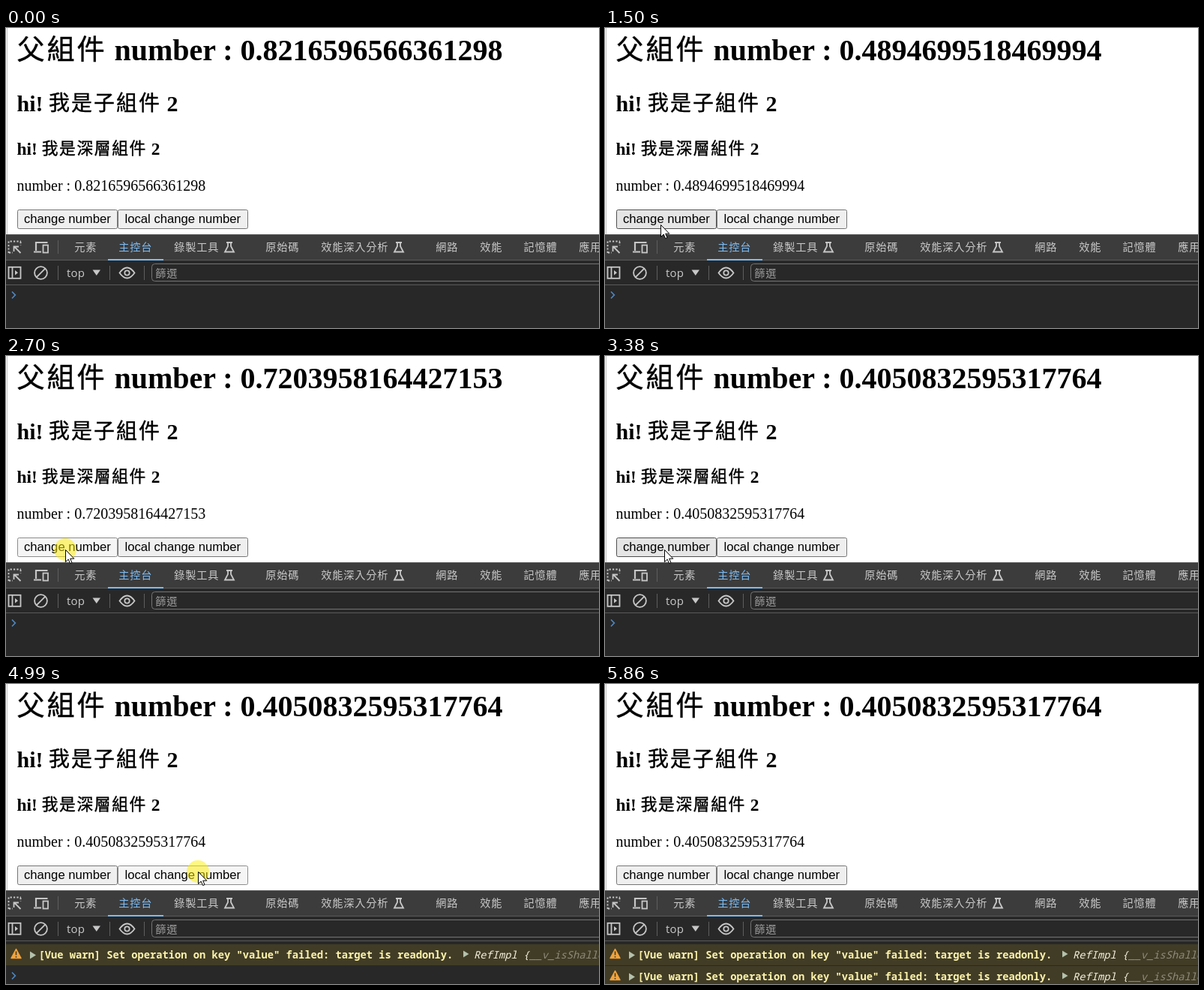
Write an HTML page that moves like this. It is 791 px wide and 400 px high and loops after 6740 ms.

```html
<!DOCTYPE html>
<html lang="zh-Hant">
<head>
<meta charset="utf-8">
<title>readonly number</title>
<style>
  html, body { margin: 0; width: 100%; height: 100%; overflow: hidden; background: #fff; }
  svg { display: block; width: 791px; height: 400px; }
  text { white-space: pre; }
  .page { font-family: "Liberation Serif", serif; font-weight: 700; }
  .page tspan.zh {
    font-family: "Noto Sans CJK TC", sans-serif; font-weight: 500; font-size: .93em;
    letter-spacing: .075em; baseline-shift: .03em; stroke: #000; stroke-width: .4px;
  }
  .button rect { fill: #efefef; stroke: #767676; }
  .button.hover rect { fill: #e5e5e5; stroke: #4f4f4f; }
  .button.active rect { fill: #f5f5f5; stroke: #8d8d8d; }
  .button text { font: 16.667px "Liberation Sans", Arial, sans-serif; }
  .tools text { font: 14.2px "Noto Sans CJK TC", sans-serif; letter-spacing: .8px; fill: #c9c9c9; }
  .tools text.on { fill: #7cbcf5; }
  .tools text.hint { fill: #9a9a9a; }
  .tools text.top { font: 15px "Open Sans", sans-serif; letter-spacing: .2px; }
  .icon { fill: none; stroke: #c7c7c7; stroke-width: 1.8; }
  .log text { font: 600 13.75px "Noto Sans Mono", "Liberation Mono", monospace; fill: #fdf3aa; }
  .log .obj { font-style: italic; font-weight: 500; fill: #f4f0dc; }
  .log .key { fill: #8f8b7a; }
</style>
</head>
<body>
<svg viewBox="0 0 791 400">
  <defs>
    <path id="flask" class="icon" d="M-4-6.5H4M-2-6.5V-1.5L-6 6H6L2-1.5V-6.5" stroke-width="1.5"/>
    <g id="warning" class="log">
      <rect y="347" width="791" height="28" fill="#413c26"/>
      <path d="M13.5 353.5L20 365.5H7Z" fill="#f2a33c" stroke="#f2a33c" stroke-width="1.5" stroke-linejoin="round"/>
      <path d="M13.5 356.5V361.5M13.5 363V364.8" stroke="#413c26" stroke-width="1.6"/>
      <path d="M32 356.5L40 361.5 32 366.5Z" fill="#b5c1ac"/>
      <text x="43.5" y="366">[Vue warn] Set operation on key "value" failed: target is readonly.</text>
      <path d="M610 355.5L617.5 360 610 364.5Z" fill="#b5c1ac"/>
      <text class="obj" x="624" y="365.5">RefImpl {<tspan class="key">__v_isShallow: false</tspan></text>
    </g>
  </defs>

  <rect width="791" height="400" fill="#fff"/>
  <rect x="1" width="1" height="275" fill="#c4c4c4"/>

  <g class="page">
    <text x="14.5" y="43" font-size="40"><tspan class="zh">父組件</tspan> number : <tspan class="num"></tspan></text>
    <text x="14.5" y="111" font-size="30">hi! <tspan class="zh">我是子組件</tspan> 2</text>
    <text x="14.5" y="169" font-size="23.4">hi! <tspan class="zh">我是深層組件</tspan> 2</text>
    <text x="14.5" y="217" font-size="20" font-weight="400">number : <tspan class="num"></tspan></text>
  </g>
  <g class="button">
    <rect x="15.5" y="242.5" width="133" height="25" rx="2"/>
    <text x="24" y="260">change number</text>
  </g>
  <g class="button">
    <rect x="149.5" y="242.5" width="173" height="25" rx="2"/>
    <text x="158.5" y="260">local change number</text>
  </g>

  <rect y="275" width="791" height="125" fill="#282828"/>
  <rect y="275" width="791" height="34" fill="#3c3c3c"/>
  <path d="M0 275.5H791M0 309.5H791M0 342.5H791" stroke="#5a5a5a"/>
  <rect x="136" y="308" width="74" height="2" fill="#7cbcf5"/>
  <path d="M69.5 283V301M69.5 317V336M138.5 317V336M184.5 317V336" stroke="#5e5e5e"/>

  <g class="tools">
    <text x="91.3" y="297">元素</text>
    <text x="150.3" y="297" class="on">主控台</text>
    <text x="224.3" y="297">錄製工具</text>
    <text x="346.3" y="297">原始碼</text>
    <text x="420.3" y="297">效能深入分析</text>
    <text x="573.3" y="297">網路</text>
    <text x="632.3" y="297">效能</text>
    <text x="690.5" y="297">記憶體</text>
    <text x="764.3" y="297">應用程式</text>
    <use href="#flask" x="298" y="292.5"/>
    <use href="#flask" x="524" y="292.5"/>
    <rect x="194.5" y="314.5" width="620" height="23" rx="4" fill="#282828" stroke="#757575"/>
    <text x="199.3" y="331.5" class="hint">篩選</text>
    <text x="81" y="331.5" class="top">top</text>
    <path d="M115.5 322.5H126L120.75 330Z" fill="#c7c7c7"/>
  </g>
  <g class="icon">
    <path d="M3.5 300V284.5H20" stroke-dasharray="2.2 2.2"/>
    <path d="M19.5 285V290M4 299.5H9" stroke-dasharray="2.2 2.2"/>
    <path d="M19.5 300L11 291.5M10.5 298V291.5H17"/>
    <path d="M40 297V286H55.5M37 298.5H47" stroke-width="2.2"/>
    <rect x="49.5" y="289.5" width="6.5" height="10"/>
    <rect x="3.5" y="318.8" width="16" height="15"/>
    <path d="M8.5 319V334"/>
    <path d="M12 323L16 326.3 12 329.6Z" fill="#c7c7c7" stroke="none"/>
    <circle cx="46.5" cy="326.5" r="8.4"/>
    <path d="M40.6 332.4L52.4 320.6"/>
    <path d="M151.5 326.5Q161.5 312.5 171.5 326.5Q161.5 340.5 151.5 326.5Z"/>
    <circle cx="161.5" cy="326.5" r="3.2"/>
  </g>

  <use href="#warning" class="warn"/>
  <use href="#warning" class="warn" y="29"/>
  <path id="prompt" d="M8 351.5L12.3 356 8 360.5" fill="none" stroke="#4f86bd" stroke-width="1.7"/>

  <circle id="halo" r="15" fill="#fff000" fill-opacity=".5"/>
  <path id="cursor" d="M.5.5V16.6L4.2 13.1 6.6 18.6 9 17.6 6.7 12.2H11.8Z" fill="#fff" stroke="#000"/>
</svg>
<script>
const LOOP = 6740;
const $ = q => document.querySelector(q);
const $$ = q => [...document.querySelectorAll(q)];
const nums = $$('.num'), buttons = $$('.button'), warns = $$('.warn');
const prompt = $('#prompt'), halo = $('#halo'), cursor = $('#cursor');

const easeOut = u => 1 - (1 - u) ** 1.8;
const easeIn = u => u ** 1.4;
const smooth = u => u * u * (3 - 2 * u);

// Each move takes n steps of dt along a quadratic curve; lead is the first step's index.
const moves = [
  { at: 330, dt: 70, n: 9, lead: 0, pts: [[643, 333], [330, 72], [73, 262]], ease: easeOut },
  { at: 1030, dt: 70, n: 1, lead: 1, pts: [[73, 262], [73, 262], [74, 262]], ease: smooth },
  { at: 1830, dt: 65, n: 2, lead: 1, pts: [[74, 262], [76, 260], [79, 258]], ease: smooth },
  { at: 3450, dt: 70, n: 7, lead: 1, pts: [[79, 258], [165, 252], [256, 250]], ease: smooth },
  { at: 5450, dt: 68, n: 6, lead: 1, pts: [[256, 250], [460, 285], [701, 390]], ease: easeIn }
];
const leave = 5860;

// halo on, button down, halo off, release
const clicks = [
  [1360, 1430, 1500, 1500],
  [1960, 1960, 2090, 2090],
  [2290, 2360, 2430, 2490],
  [2640, 2700, 2830, 2830],
  [3250, 3250, 3380, 3380],
  [4060, 4130, 4200, 4200],
  [4990, 4990, 5120, 5120]
];
const values = [
  '0.8216596566361298', '0.4894699518469994', '0.3486213714932096',
  '0.7203958164427153', '0.05318274960341827', '0.4050832595317764'
];

function pointer(t) {
  const m = moves.filter(m => t >= m.at).pop();
  if (!m || t >= leave) return null;
  const step = Math.floor((t - m.at) / m.dt) + m.lead;
  const u = m.ease(Math.min(1, step / m.n)), v = 1 - u;
  const [a, b, c] = m.pts;
  return [0, 1].map(i => Math.round(v * v * a[i] + 2 * u * v * b[i] + u * u * c[i]));
}

const show = (el, on) => el.setAttribute('visibility', on ? 'visible' : 'hidden');

function draw(t) {
  const done = clicks.filter(c => t >= c[3]).length;
  const value = values[Math.min(done, 5)];
  nums.forEach(el => { if (el.textContent !== value) el.textContent = value; });

  const p = pointer(t);
  const lit = clicks.some(c => t >= c[0] && t < c[2]);
  const down = clicks.some(c => t >= c[1] && t < c[3]);
  show(cursor, p);
  show(halo, p && lit);
  if (p) [cursor, halo].forEach(el => el.setAttribute('transform', `translate(${p})`));

  const inRow = p && p[1] >= 242 && p[1] < 268;
  const over = !inRow ? -1 : p[0] >= 15 && p[0] < 149 ? 0 : p[0] >= 149 && p[0] < 323 ? 1 : -1;
  buttons.forEach((b, i) => {
    b.classList.toggle('hover', i === over);
    b.classList.toggle('active', i === over && down);
  });

  const logs = Math.max(0, done - 5);
  warns.forEach((w, i) => show(w, i < logs));
  prompt.setAttribute('transform', `translate(0 ${logs ? 4 + 29 * logs : 0})`);
}

function frame() {
  draw(performance.now() % LOOP);
  requestAnimationFrame(frame);
}
frame();
</script>
</body>
</html>
```
